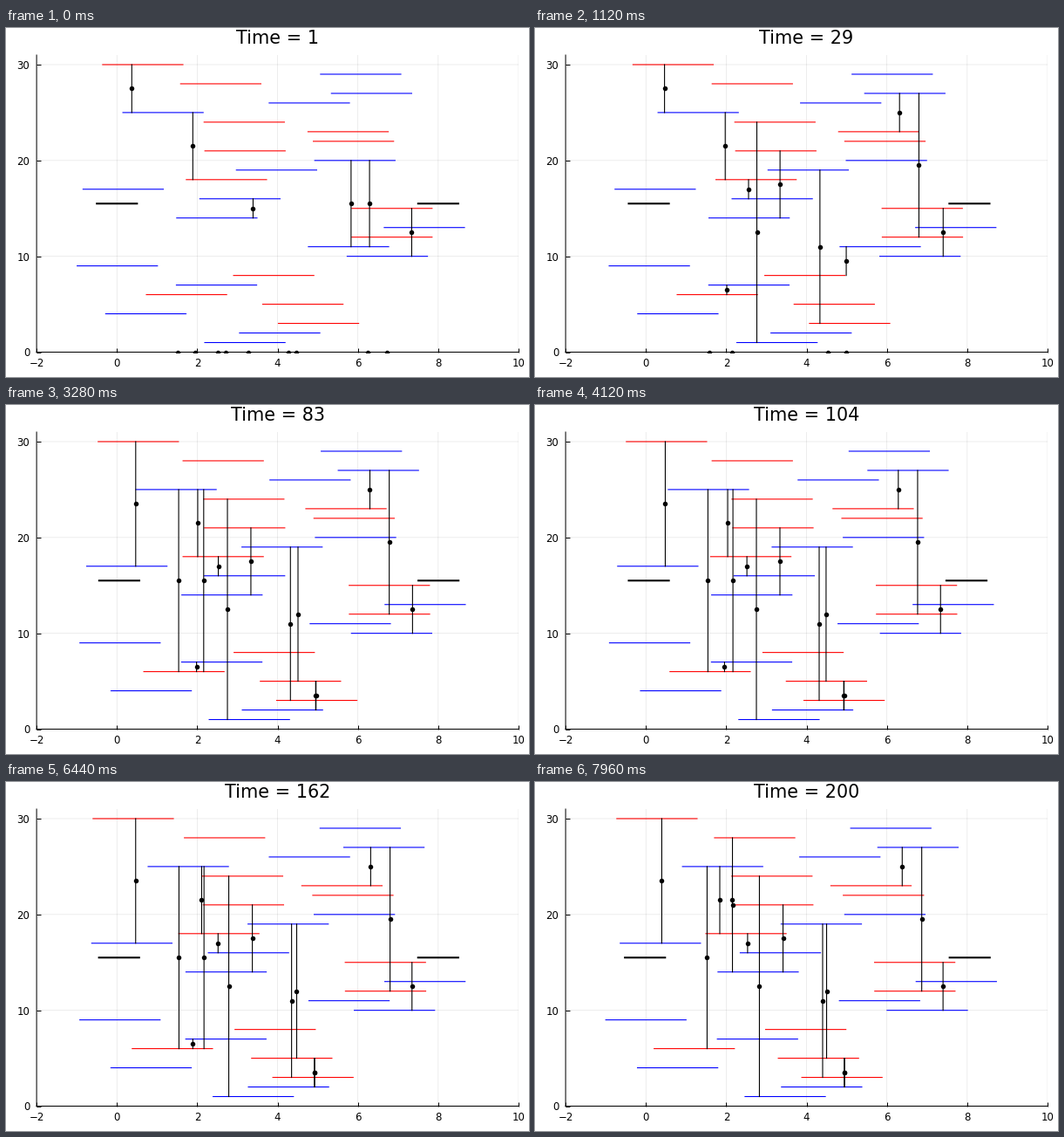
A matplotlib script that plays this animation: 600 by 400 pixels, repeating every 8 s.

```python
import matplotlib.pyplot as plt
import numpy as np
from matplotlib.animation import FuncAnimation
from matplotlib.collections import LineCollection

W, H, DPI = 600, 400, 100
FRAMES, INTERVAL = 200, 40
PX = 72 / DPI  # points per pixel
LEFT, RIGHT, TOP, BOTTOM = 35.1, 588, 31, 371.5

PULL = 0.0153   # motor force over filament friction
DRAG = 0.05     # background drag over filament friction
WALK = 0.05     # speed of a motor on parallel filaments
GAP = 3         # frames a motor spends loose before it binds again

plt.rcParams.update({"font.family": "DejaVu Sans", "path.snap": False})

# Left ends of the filaments at heights 1 to 30, then of the two adhesions
STARTS = np.array([
    2.187, 3.053, 4.02, -.28, 3.63, .733, 1.48, 2.904, -.99, 5.733,
    4.767, 5.848, 6.655, 1.488, 5.848, 2.063, -.844, 1.727, 2.974, 4.926,
    2.19, 4.89, 4.757, 2.17, .148, 3.79, 5.34, 1.585, 5.07, -.356,
    -.5, 7.5])
LENGTHS = np.array([2] * 30 + [1] * 2)
RED = {3, 5, 6, 8, 12, 15, 18, 21, 22, 23, 24, 28, 30}

# Motor: start position, then bonds as (frame, lower filament, upper filament)
MOTORS = [
    (.37, (0, 25, 30), (68, 17, 30)),
    (1.89, (0, 18, 25)),
    (3.39, (0, 14, 16), (46, 6, 25), (192, 14, 28)),
    (5.83, (0, 11, 20), (23, 8, 11), (58, 2, 5)),
    (6.29, (0, 11, 20), (72, 2, 5)),
    (7.34, (0, 10, 15)),
    (1.51, (38, 4, 30), (81, 6, 25)),
    (1.95, (6, 6, 7), (197, 18, 25)),
    (2.505, (3, 16, 18)),
    (2.7, (7, 1, 24)),
    (3.275, (9, 14, 21)),
    (4.27, (20, 3, 19)),
    (4.47, (33, 5, 19)),
    (6.24, (4, 23, 27)),
    (6.725, (5, 12, 27)),
]


def drift(n):
    """Sideways sway shared by the whole network."""
    return (1 - np.exp(-n / 6)) * (0.047 + 0.018 * np.cos(2 * np.pi * (n - 20) / FRAMES))


def bond(bonds, n):
    """The bond a motor holds, or None while it is loose."""
    if any(n < b[0] <= n + GAP for b in bonds):
        return None
    return next((b for b in reversed(bonds) if b[0] <= n), None)


def friction(x):
    """Overlapping filaments resist sliding along each other."""
    end = x + LENGTHS
    overlap = np.minimum.outer(end, end) - np.maximum.outer(x, x)
    overlap = overlap.clip(0)
    return np.diag(DRAG + overlap.sum(axis=1)) - overlap


def simulate():
    x = STARTS.copy()
    pos = [m[0] for m in MOTORS]
    finished = set()
    history = []
    for n in range(FRAMES):
        held = []
        for i, (_, *bonds) in enumerate(MOTORS):
            b = bond(bonds, n)
            held.append(b[1:] if b and (i, b[0]) not in finished else None)
        history.append((x + drift(n), np.array(pos) + drift(n), held))

        force = np.zeros(len(x))
        for pair in filter(None, held):
            if (pair[0] in RED) != (pair[1] in RED):
                for y in pair:
                    force[y - 1] += -1 if y in RED else 1
        v = PULL * np.linalg.solve(friction(x), force)

        x = x + v
        for i, pair in enumerate(held):
            if not pair:
                continue
            lo, hi = pair[0] - 1, pair[1] - 1
            pos[i] += (v[lo] + v[hi]) / 2
            if (pair[0] in RED) == (pair[1] in RED):
                stop = max(x[lo], x[hi])
                pos[i] = max(pos[i] - WALK, stop)
                if pos[i] == stop:
                    finished.add((i, bond(MOTORS[i][1:], n)[0]))
    return history


history = simulate()

fig = plt.figure(figsize=(W / DPI, H / DPI), dpi=DPI, facecolor="white")
ax = fig.add_axes([LEFT / W, 1 - BOTTOM / H, (RIGHT - LEFT) / W, (BOTTOM - TOP) / H])
ax.set(xlim=(-2, 10), ylim=(0, 31), xticks=range(-2, 11, 2), yticks=range(0, 31, 10))
ax.set_axisbelow(True)
ax.grid(color="black", alpha=0.1, lw=0.7 * PX)
ax.tick_params(direction="in", length=5 * PX, width=PX, labelsize=11.8 * PX)
ax.tick_params(axis="x", pad=6.5 * PX)
ax.tick_params(axis="y", pad=7.8 * PX)
ax.spines[["top", "right"]].set_visible(False)
ax.spines[["left", "bottom"]].set_linewidth(PX)

title = fig.text((LEFT + RIGHT) / 2 / W, 1 - 18 / H, "", size=20.8 * PX,
                 ha="center", va="baseline")


def lines(color, width, z):
    group = LineCollection([], colors=color, linewidths=width * PX,
                           capstyle="projecting", zorder=z)
    return ax.add_collection(group, autolim=False)


reds = lines("red", 1.1, 2)
blues = lines("blue", 1.1, 2)
adhesions = lines("black", 2.1, 2)
links = lines("black", 1.1, 3)
dots, = ax.plot([], [], "o", color="black", ms=5.5 * PX, mew=0, zorder=4)


def draw(n):
    x, pos, held = history[n]
    bars = {y: [(a, y), (a + 2, y)] for y, a in enumerate(x[:30], 1)}
    title.set_text(f"Time = {n + 1}")
    reds.set_segments([s for y, s in bars.items() if y in RED])
    blues.set_segments([s for y, s in bars.items() if y not in RED])
    adhesions.set_segments([[(a, 15.5), (a + 1, 15.5)] for a in x[30:]])
    links.set_segments([[(p, pair[0]), (p, pair[1])] for p, pair in zip(pos, held) if pair])
    dots.set_data(pos, [sum(pair) / 2 if pair else 0 for pair in held])
    return title, reds, blues, adhesions, links, dots


anim = FuncAnimation(fig, draw, frames=FRAMES, interval=INTERVAL, repeat=True,
                     repeat_delay=0, init_func=lambda: draw(0))
plt.show()
```
